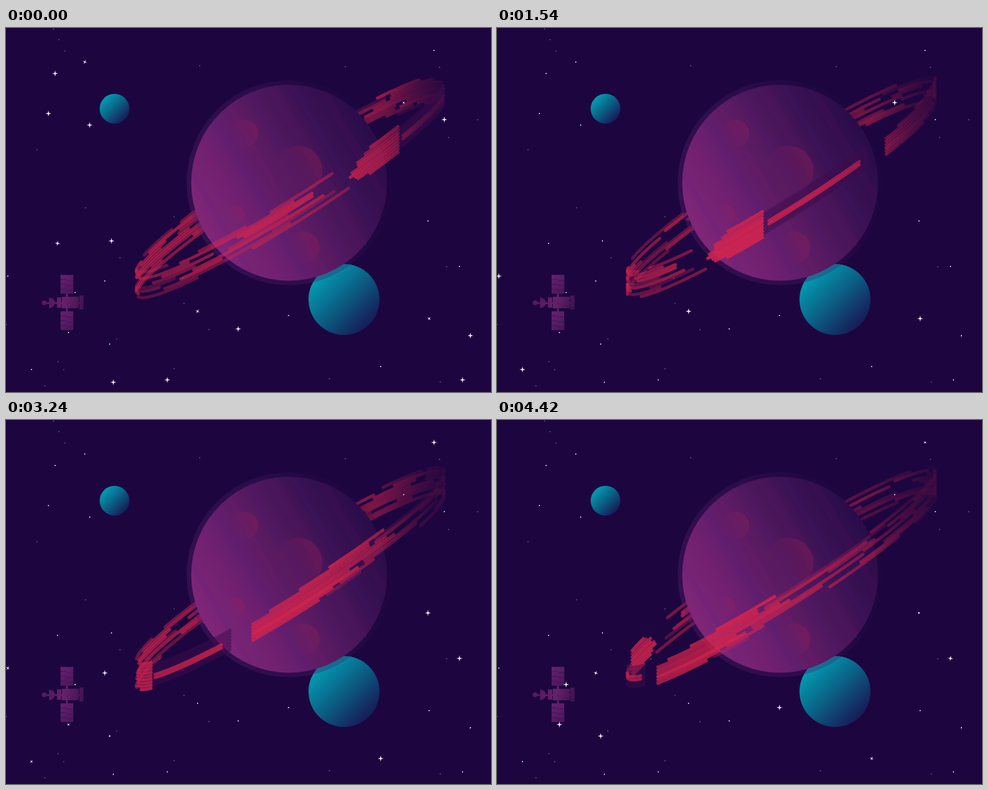
These frames come from a looping animation (800x600 px, 4440 ms). An HTML page with a canvas:

```html
<!DOCTYPE html>
<html lang="en">
<head>
<meta charset="utf-8">
<title>Ringed planet</title>
<style>
  html, body { margin: 0; width: 100%; height: 100%; overflow: hidden; background: #1d063f; }
  canvas { display: block; }
</style>
</head>
<body>
<canvas id="stage" width="800" height="600"></canvas>
<script>
const ctx = document.getElementById('stage').getContext('2d');
const LOOP = 4440, SPIN = 0.0335, TAU = Math.PI * 2;
const clamp = v => Math.max(0, Math.min(1, v));

let seed = 29;
const random = (min, max) => {
  seed = seed * 16807 % 2147483647;
  return min + (max - min) * seed / 2147483647;
};

// Sparkles come in waves; each wave closes its stars shortly after one another
const waves = [
  { close: 230, stars: [[130, 56], [85, 355], [177, 584]] },
  { close: 520, stars: [[383, 496], [766, 507], [723, 151]] },
  { close: 1030, stars: [[70, 141], [266, 580], [753, 580], [138, 160], [174, 351], [81, 75]] },
  { close: 2000, stars: [[316, 467], [698, 479], [656, 123]] },
  { close: 3400, stars: [[42, 563], [3, 409]] },
  { close: 4530, stars: [[696, 318], [706, 37], [618, 558], [163, 417], [748, 393]] },
  { close: 5330, stars: [[103, 502], [171, 521], [114, 436], [466, 474]] }
];
const dust = Array.from({ length: 32 }, () => [random(0, 800), random(0, 600)]);

// Each strand has two bright bursts, a dark lane between them and loose wisps behind
const dashes = [], shadows = [];
for (let dy = -22; dy <= 21; dy += 5.3) {
  const core = 1 - Math.abs(dy) / 26;
  const add = (from, to, alpha, cap = 'round') => dashes.push({ dy, from, to, alpha, cap });
  const front = -4 - 2.1 * Math.max(0, -8 - dy);
  const tail = front - 16 - random(25, 50) * core;
  const middle = 57 + random(8, 24) * core;
  add(tail, front, random(.68, .92), front === -4 ? 'butt' : 'round');
  add(45, middle, random(.65, .9), 'butt');
  if (core > .8) add(8, 43, .75);
  if (core > .3) shadows.push({ dy, from: 4, to: 45, alpha: .5, cap: 'butt' });
  for (let a = middle + random(3, 28); a < 345 + tail;) {
    const end = Math.min(a + random(18, 55), 357 + tail);
    add(a, end, random(.25, .72));
    a = end + random(5, 38);
  }
}

function gradient(x0, y0, x1, y1, ...colors) {
  const g = ctx.createLinearGradient(x0, y0, x1, y1);
  colors.forEach((c, i) => g.addColorStop(i / (colors.length - 1), c));
  return g;
}
function disc(x, y, r, fill) {
  ctx.fillStyle = fill;
  ctx.beginPath();
  ctx.arc(x, y, r, 0, TAU);
  ctx.fill();
}
const rect = (x, y, w, h) => ctx.fillRect(x, y, w, h);

const red = gradient(213, 0, 726, 0, '#c2224f', '#d8244b', '#d8244b', '#d8244b', 'rgba(190,32,76,.85)', 'rgba(90,16,68,.3)');

function strokeRing({ dy, from, to, alpha, cap }, turn, half) {
  ctx.globalAlpha = alpha;
  ctx.lineCap = cap;
  for (let k = -1; k < 2; k++) {
    const lo = Math.max(from + turn, half + 360 * k);
    const hi = Math.min(to + turn, half + 180 + 360 * k);
    if (lo >= hi) continue;
    const steps = Math.ceil((hi - lo) / 2);
    ctx.beginPath();
    for (let i = 0; i <= steps; i++) {
      const t = (lo + (hi - lo) * i / steps) * TAU / 360;
      ctx.lineTo(469 + 254 * Math.cos(t), 262 + dy - 156 * Math.cos(t) + 44 * Math.sin(t));
    }
    ctx.stroke();
  }
}
function drawRing(turn, half) {
  ctx.lineWidth = 5;
  ctx.strokeStyle = '#3d0c4c';
  if (!half) shadows.forEach(s => strokeRing(s, turn, half));
  ctx.strokeStyle = red;
  dashes.forEach(d => strokeRing(d, turn, half));
  ctx.globalAlpha = 1;
}

function drawMoon(x, y, r) {
  disc(x, y, r, gradient(x - r * .7, y - r * .6, x + r * .6, y + r * .7, '#0298ae', '#0b5f84', '#15215a'));
}

function drawPlanet() {
  disc(467, 255, 169, gradient(300, 330, 630, 200, 'rgba(85,30,105,.4)', 'rgba(75,24,100,.33)', 'rgba(29,6,63,.1)'));
  ctx.save();
  disc(467, 255, 161.5, gradient(328, 335, 606, 175, '#802678', '#6d2070', '#571a60', '#3c1254', '#290c4a'));
  ctx.clip();
  ctx.save();
  ctx.translate(467, 255);
  ctx.rotate(-Math.PI / 6);
  for (let i = 0; i < 8; i++) {
    ctx.fillStyle = i % 2 ? 'rgba(150,35,100,.05)' : 'rgba(55,35,140,.08)';
    rect(-135 + i * 36, -170, 9 + i % 3 * 5, 340);
  }
  ctx.restore();
  for (const [x, y, r] of [[393, 174, 23], [481, 235, 41], [377, 308, 16], [490, 362, 27]])
    disc(x, y, r, gradient(x - r * .7, y + r * .4, x + r * .9, y - r * .4,
      'rgba(160,32,90,0)', 'rgba(160,32,90,.12)', 'rgba(160,32,85,.32)'));
  ctx.restore();
}

function drawSatellite() {
  for (const y of [407, 467]) {
    ctx.fillStyle = gradient(88, y, 114, y + 31, '#68216f', '#47155a');
    rect(90, y, 21, 31);
    ctx.fillStyle = '#3c114f';
    for (let i = 0; i < 3; i++) {
      rect(90, y + 7 + 8 * i, 10, .8);
      rect(100, y + 9 + 8 * i, 11, .8);
    }
  }
  ctx.fillStyle = gradient(60, 445, 130, 462, '#4b165c', '#672069', '#3b114f');
  rect(99, 438, 3, 29);
  rect(92, 443, 28, 19);
  rect(84, 444, 7, 17);
  rect(121, 441, 7, 23);
  rect(64, 452, 60, 3);
  ctx.beginPath();
  ctx.moveTo(71, 444);
  ctx.quadraticCurveTo(80, 446, 81, 453);
  ctx.quadraticCurveTo(80, 460, 71, 462);
  ctx.fill();
  disc(63, 453, 4, '#541a60');
}

function drawSparkle(x, y, size, angle) {
  ctx.save();
  ctx.translate(x, y);
  ctx.rotate(angle);
  ctx.beginPath();
  for (let i = 0; i < 8; i++) {
    const r = i % 2 ? size * .28 : size, a = i * TAU / 8;
    ctx.lineTo(r * Math.cos(a), r * Math.sin(a));
  }
  ctx.fill();
  ctx.restore();
}

function drawSparkles(time) {
  for (const { close, stars } of waves) {
    stars.forEach(([x, y], i) => {
      const left = close + 45 * i - time;
      const open = clamp(Math.min(left, 2230 - left) / 320);
      disc(x, y, 1.1, '#ddd5e8');
      ctx.fillStyle = '#f6effb';
      if (open) drawSparkle(x, y, 1.2 + 3.7 * open, (1 - open) * TAU / 4);
    });
  }
}

function render() {
  const time = performance.now() % LOOP, turn = time * SPIN;
  ctx.fillStyle = '#1d063f';
  rect(0, 0, 800, 600);
  for (const [x, y] of dust) disc(x, y, .9, '#77659a');
  drawMoon(179, 133, 24.5);
  drawMoon(557.5, 447.5, 58.5);
  drawRing(turn, 180);
  drawPlanet();
  drawRing(turn, 0);
  drawSatellite();
  drawSparkles(time);
  requestAnimationFrame(render);
}
render();
</script>
</body>
</html>
```
